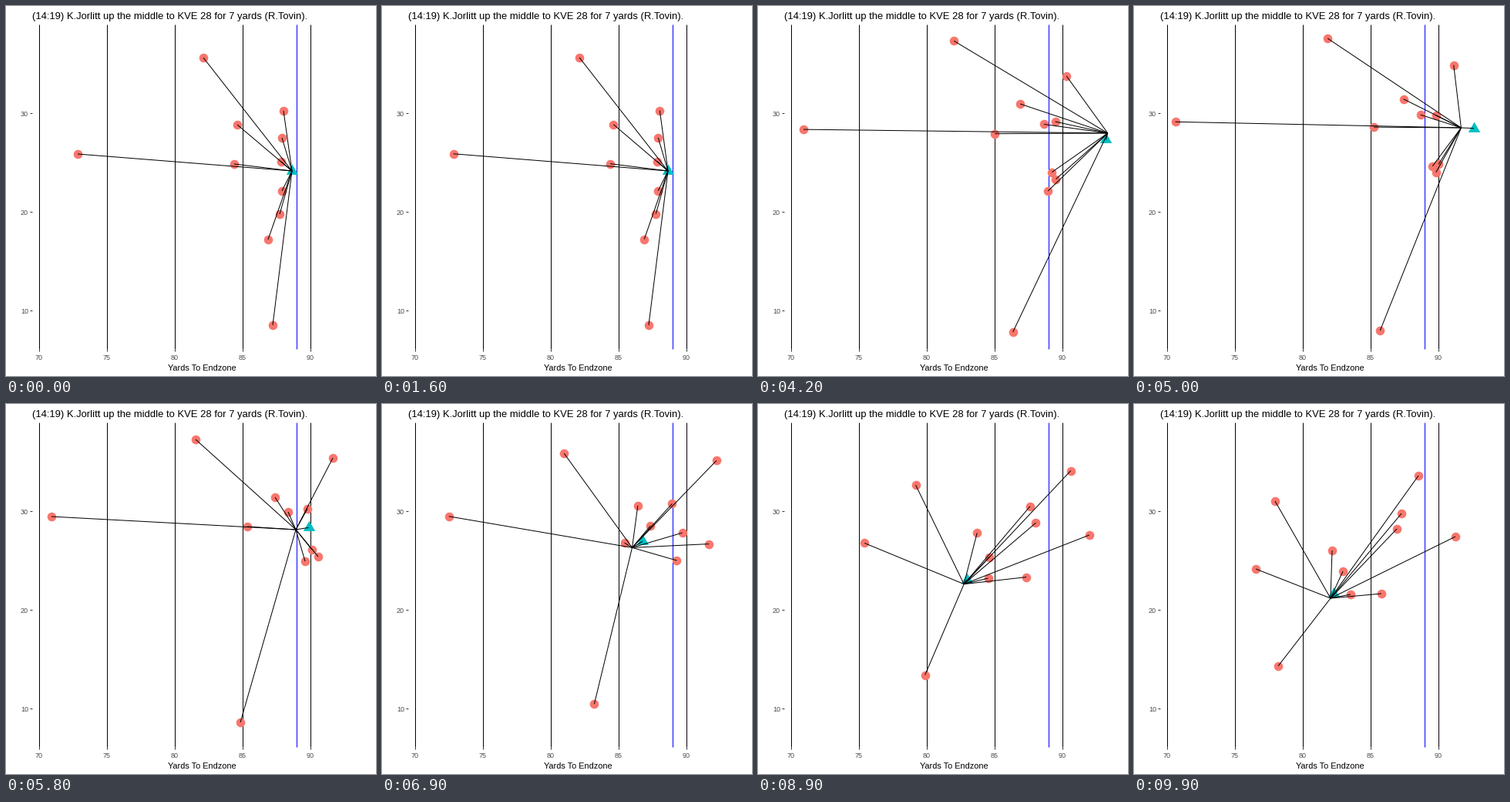
A matplotlib script for the animation above (10 s loop, 480 px wide and 480 px high).

```python
import numpy as np
import matplotlib.pyplot as plt
from matplotlib.animation import FuncAnimation
from matplotlib.collections import LineCollection

FRAMES, INTERVAL = 100, 100
SIZE, DPI = 480, 72
LEFT, TOP, BOTTOM = 34, 24, 445
RED, TEAL, GREY, DARK = "#F8766D", "#00BFC4", "#4D4D4D", "#333333"
LAG = 3  # the runner trails the point the lines meet at

plt.rcParams["font.family"] = "Liberation Sans"


def glide(keys, points):
    """Smooth motion through the points, starting from rest."""
    keys, points = np.array(keys, float), np.array(points, float)
    slope = np.gradient(points, keys, axis=0)
    slope[0] = 0

    def at(t):
        t = np.clip(t, keys[0], keys[-1])
        i = min(np.searchsorted(keys, t, side="right") - 1, len(keys) - 2)
        h = keys[i + 1] - keys[i]
        u = (t - keys[i]) / h
        ease = u * u * (3 - 2 * u)
        return (points[i] + ease * (points[i + 1] - points[i])
                + h * u * (1 - u) * ((1 - u) * slope[i] - u * slope[i + 1]))

    return at


# Each defender: at the snap, at the turn, in the chase, at the end.
BEATS = (14, 58, 80, 99)
ROUTES = {
    "safety": [(93, 192), (59, 146), (119, 156), (158, 214)],
    "top corner": [(256, 67), (246, 46), (222, 87), (183, 126)],
    "low corner": [(346, 414), (304, 413), (243, 364), (187, 340)],
    "top backer": [(300, 154), (349, 121), (307, 149), (257, 190)],
    "mid backer": [(296, 205), (313, 159), (311, 207), (281, 247)],
    "low backer": [(340, 303), (405, 198), (436, 171), (417, 172)],
    "top edge": [(360, 136), (424, 70), (431, 81), (369, 93)],
    "low edge": [(355, 270), (397, 189), (376, 152), (341, 162)],
    "top tackle": [(358, 171), (391, 136), (360, 127), (347, 142)],
    "mid tackle": [(357, 202), (366, 140), (324, 182), (271, 217)],
    "low tackle": [(358, 240), (388, 204), (369, 209), (321, 246)],
}
defence = glide(BEATS, np.swapaxes(list(ROUTES.values()), 0, 1))
goal = glide((16, 32, 43, 58, 80, 99),
             [(371, 214), (433, 195), (453, 163),
              (376, 163), (284, 216), (255, 252)])

fig = plt.figure(figsize=(SIZE / DPI, SIZE / DPI), dpi=DPI, facecolor="white")
ax = fig.add_axes([0, 0, 1, 1])
ax.set_xlim(0, SIZE)
ax.set_ylim(SIZE, 0)
ax.axis("off")


def line(x, y, color):
    ax.plot(x, y, color=color, lw=1, solid_capstyle="butt", zorder=1)


def label(x, y, text, size, color="black", ha="center"):
    ax.text(x, y, text, fontsize=size, color=color, ha=ha, va="baseline")


for yards in range(70, 95, 5):
    x = 43 + 17.6 * (yards - 70)
    line([x, x], [TOP, BOTTOM], "black")
    line([x, x], [BOTTOM, BOTTOM + 3], DARK)
    label(x, 459, str(yards), 9, GREY)
line([377, 377], [TOP, BOTTOM], "blue")  # line of scrimmage

for width in (10, 20, 30):
    y = round(394.6 - 12.8 * (width - 10))
    line([LEFT - 3, LEFT], [y, y], DARK)
    label(29, y + 4, str(width), 9, GREY, "right")

label(LEFT, 17, "(14:19) K.Jorlitt up the middle to KVE 28 for 7 yards (R.Tovin).",
      13, ha="left")
label(254, 473, "Yards To Endzone", 11)

dots, = ax.plot([], [], "o", color=RED, ms=11.6, mew=0, zorder=2)
triangle = [(0, 8.9), (7.7, -4.4), (-7.7, -4.4), (0, 8.9)]
runner, = ax.plot([], [], ls="none", marker=triangle, color=TEAL, ms=17.8,
                  mew=0, zorder=2)
links = LineCollection([], colors="black", linewidths=1, zorder=3)
ax.add_collection(links, autolim=False)


def update(t):
    spots, carrier, meet = defence(t), goal(t - LAG), goal(t)
    dots.set_data(spots[:, 0], spots[:, 1])
    runner.set_data([carrier[0]], [carrier[1]])
    links.set_segments([[spot, meet] for spot in (*spots, carrier)])
    return dots, runner, links


anim = FuncAnimation(fig, update, frames=FRAMES, interval=INTERVAL,
                     init_func=lambda: update(0), repeat=True, repeat_delay=0)
plt.show()
```
